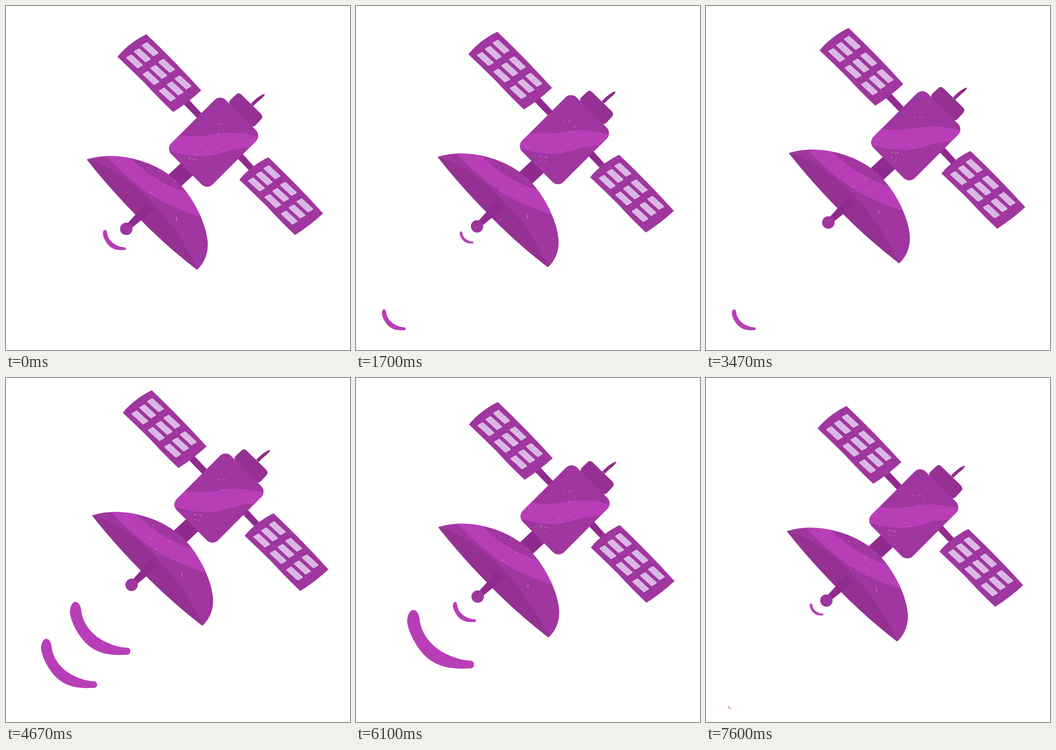
Animation, 748 px wide and 748 px high, one loop 7660 ms. Source, as an HTML page:

```html
<!DOCTYPE html>
<html lang="en">
<head>
<meta charset="utf-8">
<title>Satellite</title>
<style>
  html, body { margin: 0; width: 100%; height: 100%; overflow: hidden; background: #fff; }
  svg { display: block; width: 100%; height: 100%; }
  .main { fill: #a0369f; }
  .shade { fill: #943193; }
  .dark { fill: #8f2a8e; }
  .glow { fill: #b83eb8; }
</style>
</head>
<body>
<svg viewBox="0 0 748 748">
  <defs>
    <rect id="body" x="-83.5" y="-63.5" width="167" height="127" rx="17" transform="translate(452 295.5) rotate(-45)"/>
    <path id="dish" d="M176 333C235 314 320 332 372 380C405 412 436 470 439 512C441 540 430 560 416 573Q342 516 282 453Q223 393 176 333Z"/>
    <clipPath id="inBody"><use href="#body"/></clipPath>
    <clipPath id="inDish"><use href="#dish"/></clipPath>
    <g id="panel">
      <path class="main" d="M306 61Q370 122 425 183Q397 209 364 230Q332 200 303 168Q275 140 243 110C255 94 280 73 306 61Z"/>
      <g id="windows" fill="#dab8e3" stroke="#dab8e3" stroke-width="4" stroke-linejoin="round"></g>
    </g>
  </defs>
  <g id="waves" class="glow"></g>
  <g id="craft">
    <path class="dark" d="M385 211L396 201L427 234L417 244ZM503 330L514 320L540 349L531 359ZM354 366L384 338L410 365L381 392Z"/>
    <path class="dark" d="M533 212Q549 195 562 190.5Q565 192 558 199Q548 207 538 217Z"/>
    <use href="#panel"/>
    <use href="#panel" x="265" y="267.5"/>
    <path class="shade" d="M486 211Q485 207 489 203L502 191Q507 187 512 192L555 234Q560 240 556 245L543 259Q539 263 533 261L510 250Z"/>
    <use href="#body" class="main"/>
    <path class="glow" clip-path="url(#inBody)" d="M340 280H378C430 288 450 275 490 275C515 275 530 280 552 284V308H525C490 308 465 326 425 326C395 326 375 320 350 313Z"/>
    <use href="#dish" class="main"/>
    <g clip-path="url(#inDish)">
      <path class="glow" d="M215 322C244 356 290 398 345 427Q390 448 428 460L402 408C348 392 305 363 265 326Z"/>
      <path class="shade" d="M176 333C262 354 370 462 416 573L280 580L160 333Z"/>
    </g>
    <path class="dark" d="M303 428L321 442L296 464L274 482L265 472L284 451Z"/>
    <circle class="main" cx="262" cy="484" r="13.5"/>
    <path id="specks" fill="none" stroke="#cf80d0" stroke-width="2.2" stroke-linecap="round"/>
  </g>
</svg>
<script>
const $ = id => document.getElementById(id);
const NS = 'http://www.w3.org/2000/svg';
const addPath = (parent, d) => {
  const p = document.createElementNS(NS, 'path');
  p.setAttribute('d', d);
  return parent.appendChild(p);
};

for (let i = 0; i < 9; i++) {
  const col = i % 3, row = Math.floor(i / 3);
  addPath($('windows'), 'M-16-8L-7-13L16 8L7 13Z')
    .setAttribute('transform', `translate(${280 + 17 * col + 35.7 * row} ${120 - 13.3 * col + 36 * row})`);
}

let seed = 7;
const random = () => (seed = seed * 16807 % 2147483647) / 2147483647;
const scatter = (cx, cy, radius, count) => Array.from({ length: count }, () => {
  const a = 2 * Math.PI * random(), r = radius * Math.sqrt(random());
  return `M${cx + r * Math.cos(a)} ${cy + r * Math.sin(a)}h.01`;
}).join('');
$('specks').setAttribute('d',
  scatter(465, 288, 45, 9) + scatter(404, 338, 11, 8) + scatter(335, 395, 48, 10) + scatter(375, 459, 9, 4));

const LOOP = 7660, STEPS = 96, BOB = 24;
const LIFE = 23, GROW = 10, SHRINK = 15.2, TRAVEL = 27;
const arc = 'M-73-36C-73-48-67-61-60-61C-51-61-47-50-46-41C-43-10-21 16 4 30C24 41 44 47 61 48' +
  'C67 48 71 51 71 56C71 62 68 65 62 65C19 67-16 62-44 27C-61 5-71-18-73-36Z';

// Waves leave in pairs, twice in every half loop.
const waves = [];
for (let half = 0; half < STEPS; half += STEPS / 2)
  for (const pair of [18, 44])
    for (const gap of [0, 6])
      waves.push({ birth: half + pair + gap, path: addPath($('waves'), arc) });

const ease = u => (1 - Math.cos(Math.PI * u)) / 2;

// The picture advances in 80 ms poses shown on a 30 Hz grid.
const poseAt = t => Math.floor(Math.floor(t * 0.03 + 0.12) / 2.4 + 1e-6);

function draw(now) {
  const n = poseAt(now % LOOP);
  const lift = ease(2 * n / BOB);
  $('craft').setAttribute('transform', `translate(${12.4 * lift - 0.5} ${0.6 - 37.4 * lift})`);

  for (const { birth, path } of waves) {
    const age = (n - birth + STEPS) % STEPS;
    const shown = age > 0 && age <= LIFE;
    path.style.display = shown ? '' : 'none';
    if (!shown) continue;
    const size = 1.01 * (age < GROW ? ease(age / GROW) : 1 - ease((age - GROW) / SHRINK));
    const way = ease(age / TRAVEL);
    path.setAttribute('transform', `translate(${247 - 206 * way} ${495.6 + 232.8 * way}) scale(${size})`);
  }
}

const start = performance.now();
function tick() {
  draw(performance.now() - start);
  requestAnimationFrame(tick);
}
tick();
</script>
</body>
</html>
```
